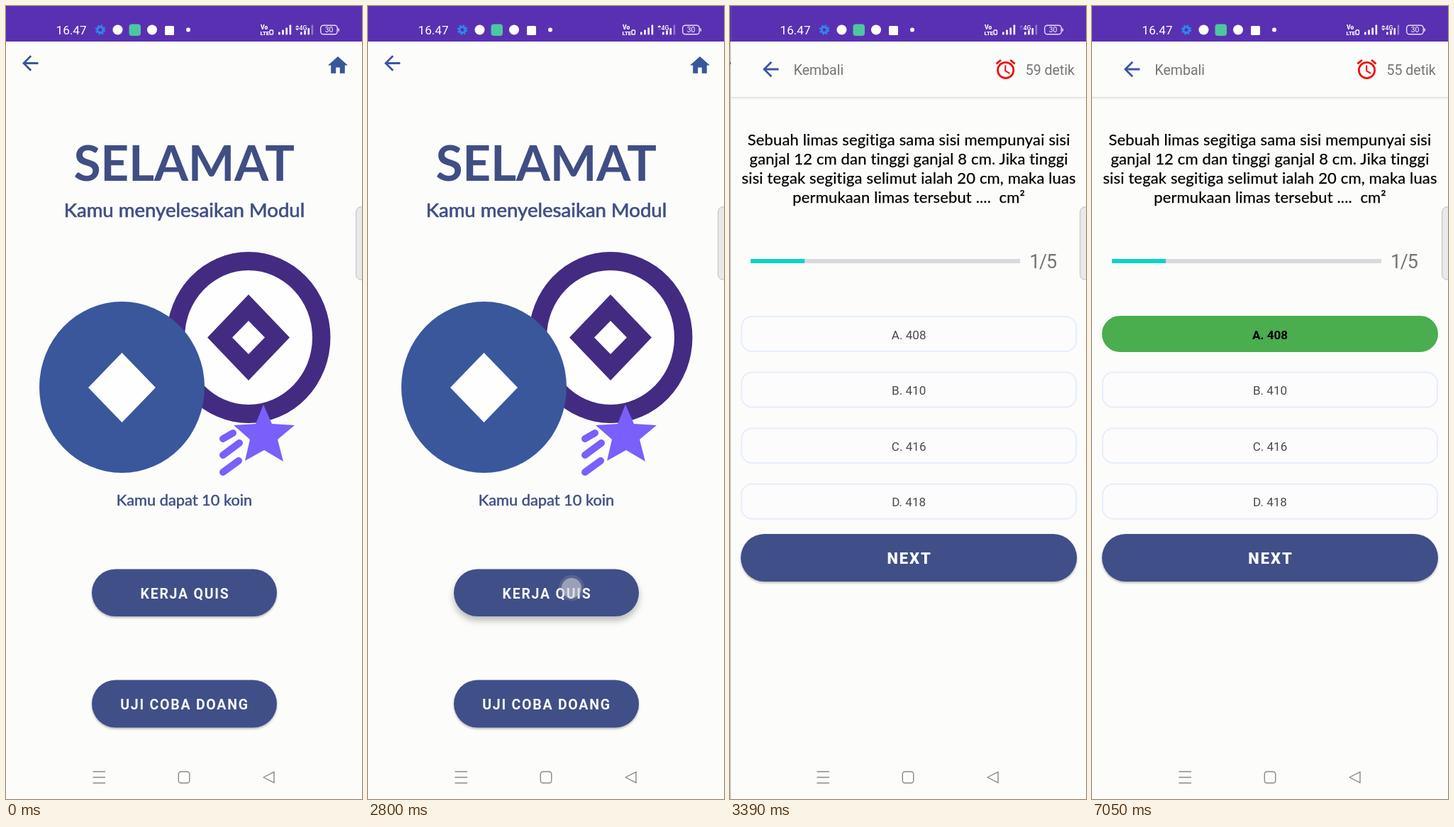
Animation of 502 by 1116 pixels, one loop 8 s. Source, as an HTML page:

```html
<!DOCTYPE html>
<html lang="id">
<head>
<meta charset="utf-8">
<title>Kuis</title>
<style>
html, body { margin: 0; width: 100%; height: 100%; overflow: hidden; background: #fcfcfb; }
svg { display: block; width: 100vw; height: 100vh; }
text { font-family: Roboto, sans-serif; }
.geo { font-family: Lato, sans-serif; }
.mid { text-anchor: middle; }
.navy { fill: #414e84; }
.blue { fill: #3a569c; }
.btn { fill: #404f87; filter: drop-shadow(0 2px 1.5px rgba(0,0,0,.26)); }
.label { fill: #f8f8fc; font-weight: 700; font-size: 19.53px; letter-spacing: 1.74px; }
.grey { fill: #757575; }
.opt rect { fill: #fcfcfd; stroke: #e6eefc; stroke-width: 2; }
.opt text { fill: #4a4a4a; font-size: 17.09px; }
.opt.on rect { stroke: #b1bde1; stroke-width: 4; }
.opt.on text { fill: #000; font-weight: 700; }
.opt.ok rect { fill: #4aad4e; stroke: #4aad4e; stroke-width: 2; }
</style>
</head>
<body>
<svg viewBox="0 0 502 1116">
  <defs>
    <path id="back" d="M20 11H7.83l5.59-5.59L12 4l-8 8 8 8 1.41-1.41L7.83 13H20z"/>
  </defs>

  <g id="result">
    <rect width="540" height="1116" fill="#fcfcfb"/>
    <rect width="540" height="50" fill="#5a30b2"/>
    <use href="#back" class="blue" transform="translate(17.4 63.7) scale(1.4)"/>
    <path class="blue" transform="translate(451.2 66.8) scale(1.4)" d="M10 20v-6h4v6h5v-8h3L12 3 2 12h3v8z"/>
    <text class="geo mid navy" x="251" y="246" font-size="69.5" font-weight="700" letter-spacing="-.3">SELAMAT</text>
    <text class="geo mid navy" x="251.5" y="297" font-size="27.6" stroke="#414e84" stroke-width=".7">Kamu menyelesaikan Modul</text>
    <ellipse cx="342" cy="466.5" rx="115.5" ry="120.5" fill="#432b82"/>
    <ellipse cx="342" cy="466.5" rx="90" ry="94.5" fill="#fefefe"/>
    <path fill="#432b82" fill-rule="evenodd" d="M342 406l58 60.5-58 60.5-58-60.5zM342 443l-23 23.5 23 23.5 23-23.5z"/>
    <ellipse cx="163.5" cy="536.5" rx="116.5" ry="120.5" fill="#3a579b"/>
    <path fill="#fefefe" d="M163.5 488l47.5 49-47.5 49-47.5-49z"/>
    <path fill="#7a5ffb" d="M363 561l12 27 32 2-24 20 8 31-27-16-27 15 7-30-23-20 31-2z"/>
    <path stroke="#7a5ffb" stroke-width="10" stroke-linecap="round" d="M306 609l14-8M306 632l23-17M306 656l22-16"/>
    <text class="geo mid navy" x="251.5" y="703" font-size="21.8" stroke="#414e84" stroke-width=".5">Kamu dapat 10 koin</text>
    <rect id="start" class="btn" x="121" y="792.5" width="261" height="66.5" rx="33.25"/>
    <text class="mid label" x="252.5" y="833.5">KERJA QUIS</text>
    <rect class="btn" x="121" y="948.5" width="261" height="67" rx="33.5"/>
    <text class="mid label" x="252" y="989.5">UJI COBA DOANG</text>
  </g>
  <rect id="dim" width="502" height="1116"/>

  <g id="quiz">
    <rect width="502" height="1116" fill="#fcfcfb"/>
    <rect width="502" height="50" fill="#5a30b2"/>
    <rect y="128" width="502" height="1.5" fill="#dcdce2"/>
    <rect y="129.5" width="502" height="2" fill="#f3f3f4"/>
    <use href="#back" class="blue" transform="translate(39.4 72.2) scale(1.4)"/>
    <text class="grey" x="88.5" y="97" font-size="19.53">Kembali</text>
    <path fill="#ee1111" transform="translate(370.8 72.4) scale(1.39)" d="M22 5.72l-4.6-3.86-1.29 1.53 4.6 3.86zM7.88 3.39L6.6 1.86 2 5.71l1.29 1.53zM12.5 8H11v6l4.75 2.85.75-1.23-4-2.37zM12 4a9 9 0 1 0 0 18 9 9 0 0 0 0-18zm0 16a7 7 0 1 1 0-14 7 7 0 0 1 0 14z"/>
    <text id="count" class="grey" x="415.5" y="97" font-size="19.53"></text>
    <g id="question"></g>
    <rect x="28" y="356" width="380" height="6" fill="#d8d8e0"/>
    <rect x="28" y="356" width="76" height="6" fill="#08d3c8"/>
    <text class="grey" x="421" y="368.5" font-size="27" letter-spacing="-1.3">1/5</text>
    <g id="options"></g>
    <rect class="btn" x="14" y="743" width="474" height="67" rx="33.5"/>
    <text class="mid" x="252" y="785" font-size="21.97" font-weight="900" letter-spacing="1.96" fill="#fafafd">NEXT</text>
  </g>

  <g id="status" fill="#fff">
    <text x="70.5" y="39.5" font-size="17.2">16.47</text>
    <g stroke="#2f87ea" fill="none">
      <circle cx="133" cy="33.5" r="4" stroke-width="3"/>
      <circle cx="133" cy="33.5" r="6.2" stroke-width="2" stroke-dasharray="2.6 2.27"/>
    </g>
    <circle cx="157.5" cy="33.5" r="7"/>
    <rect x="173.5" y="25.5" width="16.5" height="16.5" rx="4" fill="#4cc7a0"/>
    <circle cx="206" cy="33.5" r="7"/>
    <rect x="224" y="28" width="13" height="13" rx="1.5"/>
    <circle cx="257" cy="33.5" r="3"/>
    <g font-weight="900">
      <text x="359" y="33" font-size="8.5">Vo</text>
      <text x="358.5" y="40.5" font-size="7.8">LTE</text>
      <rect x="372" y="34" width="4.5" height="6" rx="1" fill="none" stroke="#fff" stroke-width="1.3"/>
    </g>
    <g id="bars"></g>
    <text x="413.5" y="33.5" font-size="8.8" font-weight="500">4G</text>
    <path id="up" d="M408 30l2.8-3 2.8 3z"/>
    <path id="down" d="M408 31.5l2.8 3 2.8-3z"/>
    <rect x="443.7" y="27.2" width="23.5" height="12.6" rx="3.8" fill="none" stroke="#e6defa" stroke-width="1.4"/>
    <path d="M468.5 31q1.5 0 1.5 2.5t-1.5 2.5z"/>
    <text class="mid" x="455.5" y="37.2" font-size="10.3">30</text>
  </g>

  <g fill="none" stroke="#888884" stroke-width="1.4" stroke-linejoin="round">
    <path d="M122.500 1077.500h17.500M122.500 1085.500h17.500M122.500 1093.500h17.500"/>
    <rect x="243.3" y="1077.5" width="15.5" height="16" rx="3.5"/>
    <path d="M363 1085.500l15-7.700v15.400z"/>
  </g>
  <rect x="493.7" y="282.7" width="20" height="102.5" rx="7" fill="#e9e9ea" stroke="#bdbdc0"/>

  <g id="touch">
    <circle r="18" fill="#bbb" opacity=".18"/>
    <circle r="14" fill="#d4d4da" opacity=".55"/>
  </g>
</svg>
<script>
const LOOP = 8000;
const $ = id => document.getElementById(id);

function add(parent, tag, attrs, text = '') {
  const el = document.createElementNS('http://www.w3.org/2000/svg', tag);
  for (const k in attrs) el.setAttribute(k, attrs[k]);
  el.textContent = text;
  return parent.appendChild(el);
}

[
  'Sebuah limas segitiga sama sisi mempunyai sisi',
  'ganjal 12 cm dan tinggi ganjal 8 cm. Jika tinggi',
  'sisi tegak segitiga selimut ialah 20 cm, maka luas',
  'permukaan limas tersebut ....\u00a0 cm²'
].forEach((line, i) => add($('question'), 'text', {
  class: 'geo mid', x: 251, y: 196 + 27 * i, 'font-size': 22, 'letter-spacing': .15,
  stroke: '#000', 'stroke-width': .25
}, line));

const options = ['A. 408', 'B. 410', 'C. 416', 'D. 418'].map((label, i) => {
  const y = 437 + 78.6 * i;
  const g = add($('options'), 'g', { class: 'opt' });
  const box = add(g, 'rect', { x: 15, y, width: 472, height: 49, rx: 15 });
  add(g, 'text', { class: 'mid', x: 251, y: y + 31.5 }, label);
  return { g, box };
});

function bars(x, heights, dimLast) {
  heights.forEach((h, i) => add($('bars'), 'rect', {
    x: x + 5.2 * i, y: 40.5 - h, width: 2.6, height: h, rx: .8,
    opacity: dimLast && i === heights.length - 1 ? .35 : 1
  }));
}
bars(384, [4, 7, 10, 14]);
bars(415, [4, 6, 9.5, 14], true);

// Cubic ease (.3, 0, .1, 1), solved by bisection.
function ease(x) {
  if (x <= 0 || x >= 1) return x <= 0 ? 0 : 1;
  let lo = 0, hi = 1, s = .5;
  for (let i = 0; i < 24; i++) {
    s = (lo + hi) / 2;
    const u = 1 - s;
    if (.9 * u * u * s + .3 * u * s * s + s * s * s < x) lo = s; else hi = s;
  }
  return s * s * (3 - 2 * s);
}

const clamp = v => Math.max(0, Math.min(1, v));
const at = (steps, t) => steps.filter(s => s[0] <= t).pop()[1];

const counter = [[0, 59], [4070, 58], [5060, 57], [6060, 56], [6990, 55]];
const arrows = [[0, [1, 1]], [1930, [1, .15]], [3200, [.3, .15]], [4070, [1, 1]], [5380, [.3, .15]], [6990, [1, 1]]];
const answer = [[0, ''], [5510, 'on'], [6400, 'on ok']];
const taps = [[2660, 2860, 287, 819], [5390, 5500, 287, 463], [6220, 6380, 287, 777]];

function draw(t) {
  const p = ease((t - 2928) / 500);
  $('result').setAttribute('transform', `translate(${-23.8 * p} 0)`);
  $('quiz').setAttribute('transform', `translate(${502 * (1 - p)} 0)`);
  $('dim').setAttribute('opacity', .235 * p);

  const lift = clamp((t - 2670) / 100) * clamp((2960 - t) / 100);
  $('start').style.filter =
    `drop-shadow(0 ${2 + 4 * lift}px ${1.5 + 3.5 * lift}px rgba(0,0,0,.26))`;

  $('count').textContent = at(counter, t) + ' detik';
  const [up, down] = at(arrows, t);
  $('up').setAttribute('opacity', up);
  $('down').setAttribute('opacity', down);

  const state = at(answer, t);
  const { g, box } = options[0];
  g.setAttribute('class', 'opt ' + state);
  const inset = state === 'on' ? 1 : 0;
  const size = { x: 15 + inset, y: 437 + inset, width: 472 - 2 * inset, height: 49 - 2 * inset };
  for (const k in size) box.setAttribute(k, size[k]);
  box.setAttribute('rx', state === 'on ok' ? 24.5 : 15);

  const tap = taps.find(([a, b]) => t >= a && t < b);
  $('touch').setAttribute('opacity', tap ? 1 : 0);
  if (tap) $('touch').setAttribute('transform', `translate(${tap[2]} ${tap[3]})`);
}

const begin = performance.now();
function tick() {
  draw((performance.now() - begin) % LOOP);
  requestAnimationFrame(tick);
}
tick();
</script>
</body>
</html>
```
